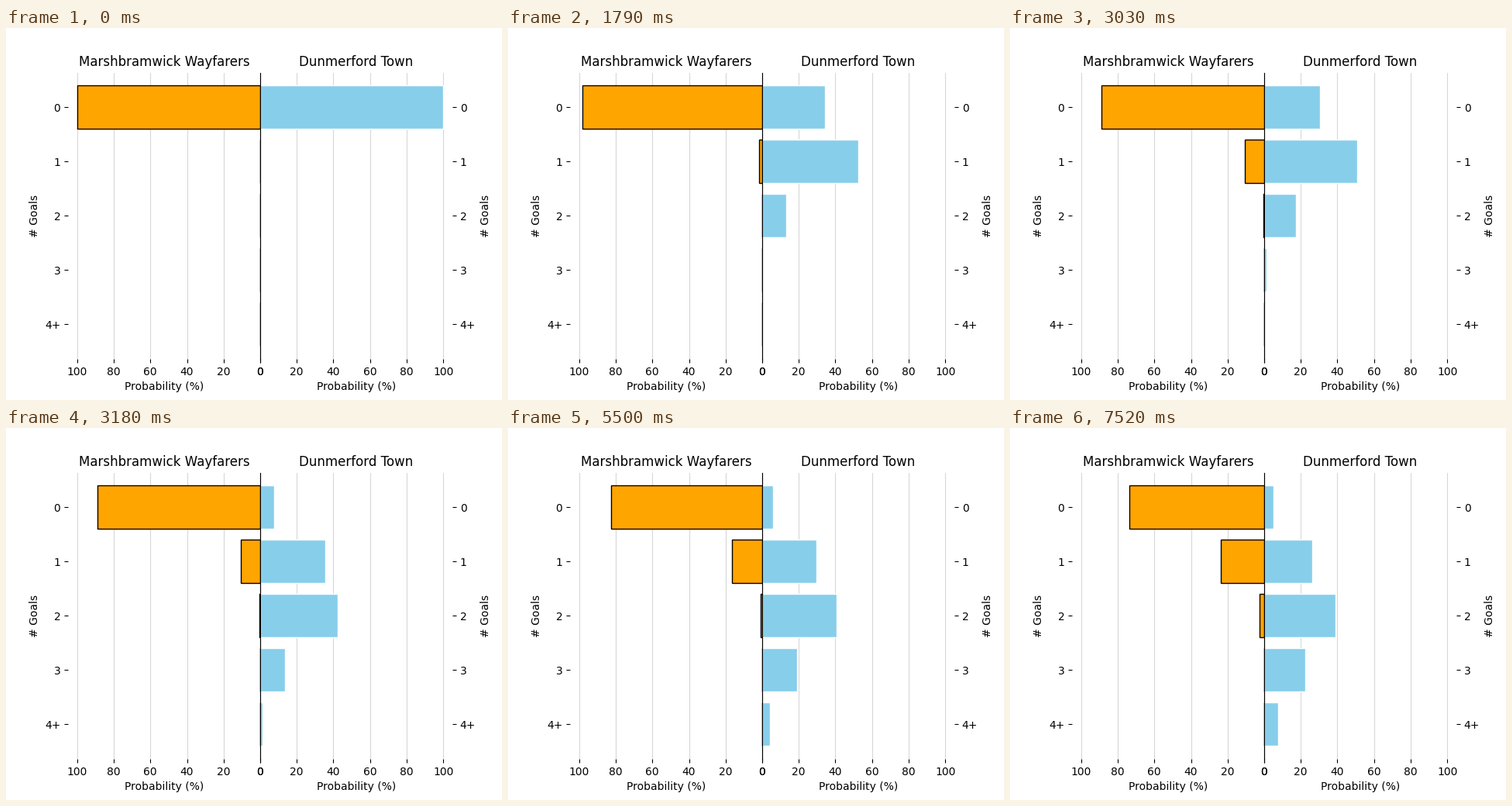
These frames come from a looping animation (640x480 px, 8000 ms). A matplotlib script:

```python
import matplotlib.pyplot as plt
import numpy as np
from matplotlib.animation import FuncAnimation

LOOP_MS = 8000
TICK_MS = 20
STEP_MS, STEPS = 30, 5        # a shot moves the bars in even steps
SHOT_MS = STEP_MS * STEPS     # length of a minute with a shot
QUIET_MS = 164.5              # length of a minute without one

# minute of each shot: its chance of scoring
HOME = {11: .08, 14: .032, 31: .073, 43: .108}
AWAY = {3: .238, 4: .551, 18: .109, 19: .751, 22: .08, 28: .118,
        34: .045, 37: .035, 46: .093}


def minute_start(minute):
    shots = sum(m < minute for m in [*HOME, *AWAY])
    return shots * SHOT_MS + (minute - shots) * QUIET_MS


def goal_odds(team, t):
    """Percent chance of 0, 1, 2, 3 and 4+ goals at time t."""
    odds = np.array([1.0])
    for minute, chance in team.items():
        step = (t - minute_start(minute)) // STEP_MS + 1
        p = chance * np.clip(step / STEPS, 0, 1)
        odds = np.convolve(odds, [1 - p, p])
    return 100 * np.append(odds[:4], odds[4:].sum())


def make_panel(ax, title, color, edge, inner):
    bars = ax.barh(range(5), [0] * 5, color=color, edgecolor=edge)
    ax.set(title=title, xlabel="Probability (%)", ylabel="# Goals",
           xlim=(0, 105), ylim=(4.64, -0.64), xticks=range(0, 101, 20))
    ax.set_yticks(range(5), ["0", "1", "2", "3", "4+"])
    ax.set_axisbelow(True)
    ax.grid(axis="x", alpha=0.5)
    ax.spines[:].set_visible(False)
    ax.spines[inner].set_visible(True)
    return bars


fig, (left, right) = plt.subplots(1, 2, figsize=(6.4, 4.8), dpi=100)
fig.subplots_adjust(left=0.125, right=0.9, bottom=0.11, top=0.88, wspace=0)

home_bars = make_panel(left, "Marshbramwick Wayfarers", "orange", "black", "right")
left.invert_xaxis()

away_bars = make_panel(right, "Dunmerford Town", "skyblue", "white", "left")
right.yaxis.tick_right()
right.yaxis.set_label_position("right")


def update(i):
    t = (i + 0.5) * TICK_MS
    for bars, team in ((home_bars, HOME), (away_bars, AWAY)):
        for bar, width in zip(bars, goal_odds(team, t)):
            bar.set_width(width)
    return [*home_bars, *away_bars]


update(0)
anim = FuncAnimation(fig, update, frames=LOOP_MS // TICK_MS,
                     interval=TICK_MS, repeat=True, repeat_delay=0)
plt.show()
```
